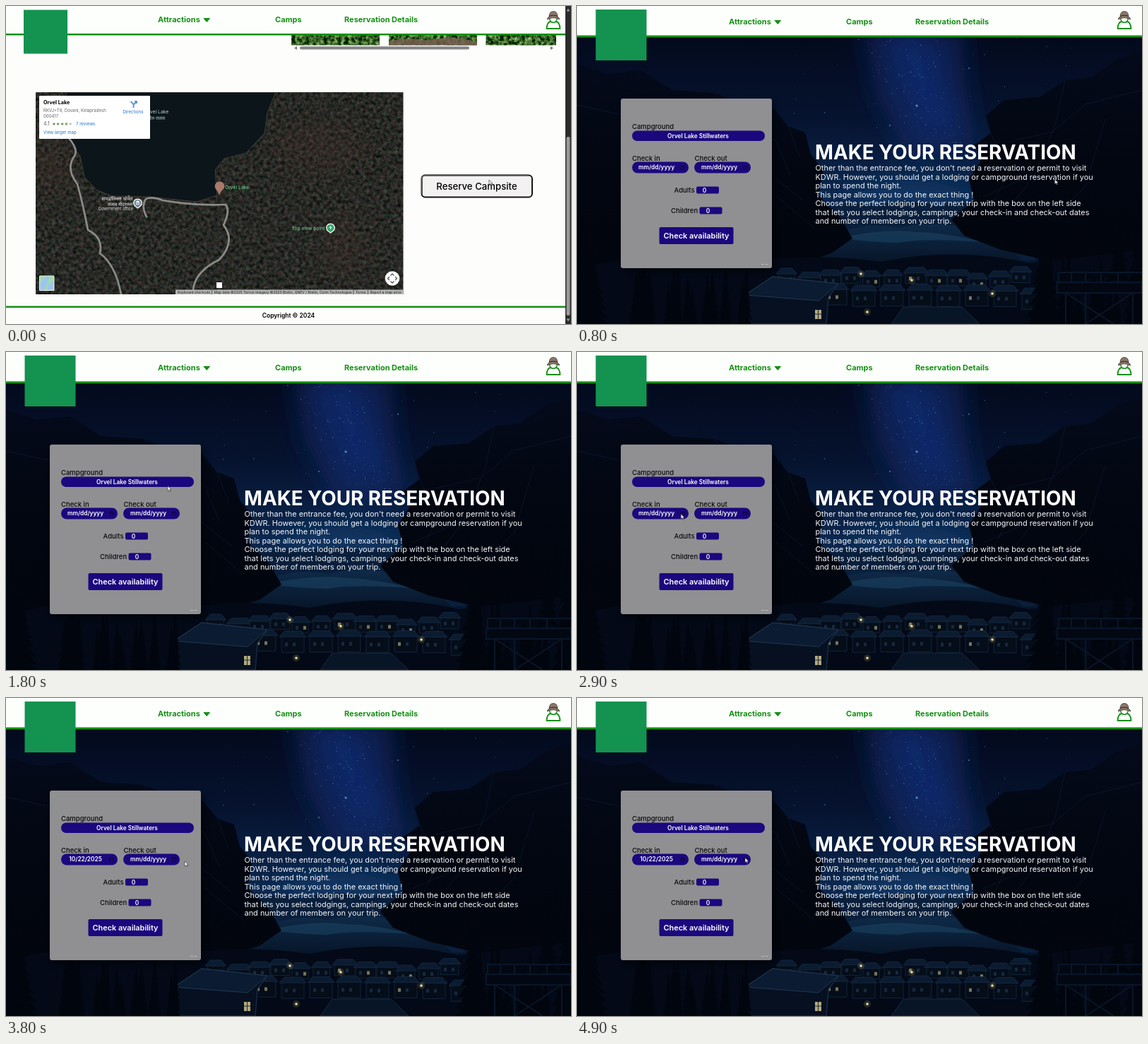
Animation, 800 px wide and 450 px high, one loop 5000 ms. Source, as an HTML page:

```html
<!DOCTYPE html>
<html lang="en">
<head>
<meta charset="utf-8">
<title>Campsite reservation</title>
<style>
html, body { margin: 0; width: 100%; height: 100%; overflow: hidden; background: #02060f; }
svg { display: block; width: 100vw; height: 100vh; }
text { font-family: Inter, "Noto Sans", sans-serif; white-space: pre; }
.nav { font-size: 11px; font-weight: 700; fill: #159015; }
.label { font-size: 9.5px; font-weight: 500; fill: #0b0b0d; }
.value { font-size: 8.3px; font-weight: 600; fill: #fff; text-anchor: middle; }
.body { font-size: 10.95px; fill: #f4f6fa; }
.tiny { font-size: 5px; fill: #222; }
.place { font-size: 6.8px; fill: #7ddb9c; }
.white { fill: #eee; text-anchor: end; }
.link { fill: #2374d0; }
.field { fill: #1b087e; }

#campsite { animation: first 5s step-end infinite; }
#blank { animation: blank 5s step-end infinite; }
#picked { animation: picked 5s step-end infinite; }
#pointer { animation: glide 5s linear infinite; }
@keyframes first { 0% { opacity: 1 } 2%, 100% { opacity: 0 } }
@keyframes blank { 0% { opacity: 1 } 68%, 100% { opacity: 0 } }
@keyframes picked { 0% { opacity: 0 } 68%, 100% { opacity: 1 } }
@keyframes glide {
  0%, 14% { transform: translate(684px, 246px); animation-timing-function: ease-in-out }
  36% { transform: translate(229px, 189.5px); animation-timing-function: ease-in-out }
  46%, 57% { transform: translate(147px, 228px); animation-timing-function: ease-in-out }
  66% { transform: translate(150px, 275px); animation-timing-function: ease-in-out }
  76% { transform: translate(253px, 231px); animation-timing-function: ease-out }
  90%, 100% { transform: translate(238px, 226px) }
}
</style>
</head>
<body>
<svg viewBox="0 0 800 450" preserveAspectRatio="none">
<defs>
  <filter id="forest" x="0" y="0" width="1" height="1" color-interpolation-filters="sRGB">
    <feTurbulence type="fractalNoise" baseFrequency=".2" numOctaves="4" seed="7"/>
    <feColorMatrix values=".35 .15 0 0 -.095  .3 0 .12 0 -.05  .3 0 0 0 -.005  0 0 0 0 1"/>
  </filter>
  <filter id="leaves" x="0" y="0" width="1" height="1" color-interpolation-filters="sRGB">
    <feTurbulence type="fractalNoise" baseFrequency=".2" numOctaves="3" seed="3"/>
    <feColorMatrix values="1.2 0 0 0 -.38  1.3 0 0 0 -.27  .9 0 0 0 -.3  0 0 0 0 1"/>
    <feComposite in2="SourceGraphic" operator="in"/>
  </filter>
  <filter id="soft" x="-50%" y="-50%" width="200%" height="200%"><feGaussianBlur stdDeviation="18"/></filter>
  <filter id="shade" x="-10%" y="-10%" width="120%" height="120%"><feGaussianBlur stdDeviation="4"/></filter>
  <linearGradient id="sky" x2="0" y2="1">
    <stop stop-color="#020616"/><stop offset=".35" stop-color="#06132f"/>
    <stop offset=".6" stop-color="#0b2850"/><stop offset=".75" stop-color="#081a35"/><stop offset="1" stop-color="#02060f"/>
  </linearGradient>
  <linearGradient id="rock" x2="0" y2="1">
    <stop stop-color="#040a1a"/><stop offset=".5" stop-color="#020610"/><stop offset="1" stop-color="#02050d"/>
  </linearGradient>
  <linearGradient id="hill" x2="0" y2="1"><stop stop-color="#0e2a48"/><stop offset="1" stop-color="#050f1f"/></linearGradient>
  <clipPath id="mapClip"><path d="M42 122h520.5v286H42z"/></clipPath>
  <g id="person">
    <path d="M-9.5 16.5Q-9 7.5-4 6.5Q0 9 4 6.5Q9 7.5 9.5 16.5Z" fill="#fff" stroke="#159015" stroke-width="1.8" stroke-linejoin="round"/>
    <circle cy="2.5" r="5.2" fill="#fff" stroke="#159015" stroke-width="1.5"/>
    <path d="M-6 0Q-6-8 0-8Q6-8 6 0Q9 1 8.5 3.5Q0-1-8.5 3.5Q-9 1-6 0Z" fill="#8a766a" stroke="#3a302c" stroke-width=".7"/>
    <path d="M-6-1Q0-3.5 6-1" fill="none" stroke="#332923" stroke-width="1.2"/>
  </g>
  <g id="menu">
    <text class="nav" x="215" y="26">Attractions</text>
    <path d="M280 20.5h8.5l-4.2 5z" fill="#159015" stroke="#159015" stroke-linejoin="round"/>
    <text class="nav" x="381" y="26">Camps</text>
    <text class="nav" x="479" y="26">Reservation Details</text>
  </g>
</defs>

<g id="booking">
  <rect width="800" height="450" fill="url(#sky)"/>
  <g filter="url(#soft)">
    <path d="M405 30H545L550 110 565 200 470 215 425 130Z" fill="#0e2c74" opacity=".6"/>
    <path d="M440 40H490L515 120 535 175 490 160Z" fill="#1c3c94" opacity=".35"/>
    <ellipse cx="475" cy="268" rx="85" ry="20" fill="#17487a" opacity=".55"/>
  </g>
  <g id="stars"></g>
  <path d="M325 298Q380 270 420 284Q470 268 510 284Q550 270 620 296L650 360H300Z" fill="#091f3b"/>
  <path d="M340 337Q395 302 455 314Q520 298 600 328L650 380H320Z" fill="url(#hill)"/>
  <path d="M370 328Q440 314 482 320Q525 321 575 334Q490 328 455 335Q410 334 370 328Z" fill="#1c4564" opacity=".55"/>
  <path d="M0 82L45 96 90 91 135 119 195 123 240 142 279 146 299 170 323 179 331 210 349 232 342 268 374 301 390 329 360 350 300 370 0 400Z" fill="url(#rock)"/>
  <path d="M800 64L765 75 728 101 691 105 655 129 605 133 579 155 586 180 562 197 574 215 555 245 562 275 530 302 548 325 600 345 800 390Z" fill="url(#rock)"/>
  <g fill="none" stroke="#10294b" opacity=".4">
    <path d="M0 140L72 156 118 194M195 123L221 165 281 190 302 239M240 142L251 220 320 275M282 269L337 315M299 170L315 213"/>
    <path d="M800 119L720 139 673 178 608 193M691 105L678 165 650 237 618 278M586 180L611 235 583 292M748 160L720 255 672 303M650 237L575 270"/>
  </g>
  <path d="M0 373Q120 337 230 365Q330 347 430 362Q540 340 640 364L800 345V450H0Z" fill="#030916"/>
  <g id="town"></g>
  <g id="pines" fill="#01050d"></g>
  <path d="M680 391H800V406H680ZM692 406V450M720 406V450M787 406V450M692 406L760 450M787 406L720 450M682 391V377H800M700 391V377M720 391V377M742 391V377M766 391V377" fill="#020711" stroke="#091629" stroke-width="2"/>

  <rect width="800" height="42" fill="#fdfffc"/>
  <rect y="41.5" width="800" height="3" fill="#159015"/>
  <use href="#menu"/>
  <use href="#person" x="775" y="15.5"/>
  <rect x="26.5" y="5" width="72" height="72" fill="#14924f"/>

  <rect x="66" y="135" width="214" height="240" rx="3" fill="#000" opacity=".5" filter="url(#shade)"/>
  <rect x="62" y="131" width="214" height="240" rx="3" fill="#909092"/>
  <text class="label" x="78" y="174">Campground</text>
  <rect class="field" x="78" y="176.5" width="188" height="14.5" rx="7.2"/>
  <text class="value" x="171.5" y="186.6">Orvel Lake Stillwaters</text>
  <text class="label" x="78" y="218.5">Check in</text>
  <text class="label" x="166.5" y="218.5">Check out</text>
  <rect class="field" x="78" y="220.5" width="80" height="16" rx="8"/>
  <rect class="field" x="166" y="220.5" width="80" height="16" rx="8"/>
  <path d="M147 226h5v5h-5zM147 227.5h5M235.5 226h5v5h-5zM235.5 227.5h5" fill="none" stroke="#100444"/>
  <text class="value" id="blank" x="112.5" y="231.3">mm/dd/yyyy</text>
  <text class="value" id="picked" x="112.5" y="231.3">10/22/2025</text>
  <text class="value" x="201.5" y="231.3">mm/dd/yyyy</text>
  <text class="label" x="137.5" y="263.7">Adults</text>
  <rect class="field" x="169" y="255.5" width="32" height="10" rx="2"/>
  <text class="value" x="180.5" y="263.5">0</text>
  <text class="label" x="133" y="292.7">Children</text>
  <rect class="field" x="173.5" y="284.5" width="32" height="10" rx="2"/>
  <text class="value" x="185.5" y="292.5">0</text>
  <rect class="field" x="116.5" y="313" width="105" height="24" rx="2"/>
  <text x="169" y="329" font-size="10.9" font-weight="600" fill="#fff" text-anchor="middle">Check availability</text>
  <path d="M261 365.500h4m1.5 0h4" stroke="#bbb"/>

  <text x="337" y="217" font-size="27.8" font-weight="700" fill="#fff">MAKE YOUR RESERVATION</text>
  <g id="copy"></g>
</g>

<g id="campsite">
  <rect width="800" height="450" fill="#fdfdfb"/>
  <path d="M404 41h125v14.5H404zM542 41h125v14.5H542zM679.5 41h99.5v14.5h-99.5z" filter="url(#leaves)"/>
  <path d="M542 55.5V50Q570 43 600 49Q630 40 667 51V55.5Z" fill="#755d50" opacity=".85"/>
  <rect x="416" y="57.2" width="240" height="4.3" rx="2.1" fill="#858585"/>
  <path d="M412 57v5l-4-2.5zM771 57v5l4-2.5z" fill="#777"/>
  <rect width="793" height="39" fill="#fdfffc"/>
  <rect y="39" width="793" height="2.5" fill="#159015"/>
  <use href="#menu" y="-3"/>
  <use href="#person" x="775" y="15.5"/>
  <rect x="25" y="5.5" width="62" height="62" fill="#14924f"/>

  <g clip-path="url(#mapClip)">
    <rect x="42" y="122" width="521" height="286" filter="url(#forest)"/>
    <g filter="url(#soft)" opacity=".3" fill="#4a332c">
      <ellipse cx="445" cy="200" rx="65" ry="35"/><ellipse cx="477" cy="340" rx="28" ry="45"/><ellipse cx="65" cy="225" rx="30" ry="45"/>
    </g>
    <path d="M85 122V188L105 212 111 242 128 260 150 269 203 270 270 277 299 268 296 232 309 216 340 208 366 180 370 151 382 122Z" fill="#0c1519" stroke="#443b35"/>
    <g fill="none" stroke="#8b8b88" stroke-width="2.7" stroke-linejoin="round" stroke-linecap="round">
      <path d="M88 186Q103 203 97 212Q84 230 101 252Q109 280 116 317Q138 328 133 350Q155 366 163 408"/>
      <path d="M199 298Q191 283 198 273Q207 269 222 275Q267 283 311 281Q318 289 308 310Q326 333 302 359Q263 378 265 408"/>
    </g>
    <text class="place" x="196" y="152" style="fill:#b9d5df">Orvel Lake</text>
    <text class="place" x="196" y="161" style="fill:#b9d5df">ओर्वेल तलाव</text>
    <path d="M302 268Q300 262 297 259A6.8 6.8 0 1 1 308 259Q304 262 302 268Z" fill="#a77a6b"/>
    <text class="place" x="310" y="258.5">Orvel Lake</text>
    <text class="place" x="404.5" y="316.5">Top view point</text>
    <g stroke="#fff" stroke-width="1.2">
      <path d="M459.5 321L456 318.5A5.8 5.8 0 1 1 463 318.5Z" fill="#36a76b"/>
      <path d="M186.5 286L183 283.5A5.8 5.8 0 1 1 190 283.5Z" fill="#708996"/>
    </g>
    <path d="M457.5 313.5h4M459.5 311v5M183.5 280.5h6M184 277.5h5l-2.5-2zM185 278v2M188 278v2" stroke="#fff" stroke-width=".8" fill="#fff"/>
    <text class="place white" x="179.5" y="274.5">हायड्रॉलिक्स ओर्वेल</text>
    <text class="place white" x="179.5" y="282.5">तलाव मीटररूम</text>
    <text class="place white" x="180" y="289" style="font-size:5.6px">Government office</text>
    <rect x="47" y="127" width="157" height="61" rx="1" fill="#fff"/>
    <text x="53" y="139" font-size="7.2" font-weight="700">Orvel Lake</text>
    <g font-size="6.1" fill="#666">
      <text x="53" y="150">RKVJ+T8, Dovani, Kelapradesh</text>
      <text x="53" y="157.7">000417</text>
      <text x="53" y="168.7" font-size="7.2">4.1</text>
      <text x="65" y="168.7" font-size="6.5" fill="#658d4d" style="font-family:'DejaVu Sans',sans-serif">★★★★<tspan fill="#bbb">★</tspan></text>
      <text class="link" x="99" y="168.5">7 reviews</text>
      <text class="link" x="53" y="181">View larger map</text>
      <text class="link" x="180" y="152" text-anchor="middle">Directions</text>
    </g>
    <path d="M180.5 144V139L176.5 135M180.5 140L184 136M182 135h3v3" fill="none" stroke="#6798d2" stroke-width="2"/>
    <path d="M47.5 382h20.5v20.5H47.5z" fill="#a1d9b0" stroke="#eee"/>
    <path d="M48 392L56 383H62L54 402H48ZM59 395l8-6v12h-8z" fill="#9fc5ed"/>
    <circle cx="547" cy="385.5" r="10.3" fill="#fff"/>
    <path d="M544.5 381.5l2.5-2.5 2.5 2.5M544.5 389.5l2.5 2.5 2.5-2.5M543 383l-2.5 2.5 2.5 2.5M551 383l2.5 2.5-2.5 2.5" fill="none" stroke="#555" stroke-width="1.3"/>
    <rect x="298" y="391" width="8" height="8" fill="#fff"/>
    <rect x="240" y="401.5" width="323" height="7" fill="#b4b6b4"/>
    <text class="tiny" x="243" y="406.8">Keyboard shortcuts</text>
    <text class="tiny" x="294.5" y="406.8">Map data ©2025 Terrun Imagery ©2025 Brelto, QNEV / Brelto, Ozrin Technologies</text>
    <text class="tiny" x="495" y="406.8">Terms</text>
    <text class="tiny" x="515.5" y="406.8">Report a map error</text>
    <path d="M291.5 402v6M492 402v6M512.5 402v6" stroke="#333" stroke-width=".7"/>
  </g>
  <rect x="588.5" y="239.5" width="156.5" height="31" rx="5" fill="#f3f1f2" stroke="#151515" stroke-width="2"/>
  <path d="M589 266V244Q589 239.5 593 239.5H740" fill="none" stroke="#555" stroke-width="2"/>
  <text x="666.5" y="259.7" font-size="13.2" font-weight="500" text-anchor="middle">Reserve Campsite</text>
  <rect y="424.5" width="793" height="2.5" fill="#159015"/>
  <text x="400" y="441" font-size="8.5" font-weight="600" text-anchor="middle">Copyright © 2024</text>
  <rect x="792" width="8" height="450" fill="#2b2b2b"/>
  <rect x="793.5" y="185" width="5" height="253" rx="2.5" fill="#9b9b9b"/>
  <path d="M793.5 7.5h5l-2.5-4zM793.5 442.5h5l-2.5 4z" fill="#9b9b9b"/>
</g>

<path id="pointer" d="M0 0V7L1.7 5.5 2.8 8 4 7.4 2.9 5.1H5Z" fill="#fff" stroke="#222" stroke-width=".6"/>
</svg>
<script>
let seed = 41;
const rand = () => (seed = seed * 16807 % 2147483647) / 2147483647;
const fill = (id, markup) => document.getElementById(id).innerHTML = markup;
const repeat = (count, draw) => Array.from({ length: count }, (_, i) => draw(i)).join("");

const copy = `Other than the entrance fee, you don't need a reservation or permit to visit
KDWR. However, you should get a lodging or campground reservation if you
plan to spend the night.
This page allows you to do the exact thing !
Choose the perfect lodging for your next trip with the box on the left side
that lets you select lodgings, campings, your check-in and check-out dates
and number of members on your trip.`;
fill("copy", copy.split("\n").map((line, i) =>
  `<text class="body" x="337.5" y="${233.3 + i * 12.5}">${line}</text>`).join(""));

const star = (x, y, r, alpha) => `<circle cx="${x}" cy="${y}" r="${r}" fill="#5f8fdc" opacity="${alpha}"/>`;
fill("stars", repeat(260, i => {
  const y = 45 + rand() * 150;
  const band = 455 + (y - 45) * .4 + (rand() + rand() - 1) * 65;
  const x = i % 4 ? band : 300 + rand() * 400;
  return star(x, y, .25 + rand() * .5, .2 + rand() * .6);
}) + star(481, 141, 1.5, 1) + star(555, 88, 1, .8) + star(443, 169, 1, .8));

function house(x, y, w, h) {
  const windows = repeat(Math.floor(w / 11), i =>
    `<rect x="${x + 5 + i * 11}" y="${y + h * .45}" width="4" height="5" fill="${rand() > .82 ? "#77765a" : "#162940"}"/>`);
  return `<path d="M${x} ${y}h${w}v${h}h${-w}z" fill="#050d19" stroke="#11243a"/>
    <path d="M${x - 3} ${y + 3}l7 -8h${w - 8}l7 8z" fill="#0b1b30" stroke="#172d47" stroke-width=".8"/>${windows}`;
}
const lamp = (x, y) =>
  `<circle cx="${x}" cy="${y}" r="5" fill="#a99558" opacity=".22"/><circle cx="${x}" cy="${y}" r="1.8" fill="#eee1ab"/>`;
fill("town", repeat(12, i => house(285 + i * 30, 372 + rand() * 12, 23 + rand() * 8, 18)) +
  repeat(8, i => house(350 + i * 40, 398 + rand() * 10, 32, 25)) +
  `<path d="M238 409L277 383 370 393 356 412 353 450H245Z" fill="#061020" stroke="#162a45" stroke-width="1.5"/>
   <path d="M238 409L277 383 370 393 342 417Z" fill="#0b1b31" stroke="#20384f"/>
   <path d="M337 430h9v13h-9z" fill="#b4a97b"/><path d="M341.5 430v13M337 436h9" stroke="#18283a"/>
   <path d="M445 450L462 426H545L570 450Z" fill="#081526" stroke="#152b43"/>` +
  lamp(474, 388) + lamp(588, 407) + lamp(402, 379) + lamp(411, 433));

function pine(x, top, base, width) {
  const steps = 9;
  const side = dir => Array.from({ length: steps }, (_, i) => {
    const y = top + (base - top) * (i + 1) / steps;
    const reach = width * (i + 1) / steps / 2;
    return [`${x + dir * reach} ${y}`, `${x + dir * reach * .5} ${y - 2}`];
  });
  return `<path d="M${x} ${top}L${side(1).flat().join("L")}L${side(-1).reverse().map(p => p.reverse()).flat().join("L")}Z"/>`;
}
fill("pines", repeat(42, i => {
  const x = i < 25 ? rand() * 245 : 640 + rand() * 160;
  return pine(x, 345 + rand() * 65, 455, 13 + rand() * 15);
}) + pine(22, 345, 455, 52) + pine(93, 340, 455, 44) + pine(8, 295, 455, 36) +
  pine(662, 317, 455, 58) + pine(767, 307, 390, 34) + pine(796, 277, 455, 50));
</script>
</body>
</html>
```
